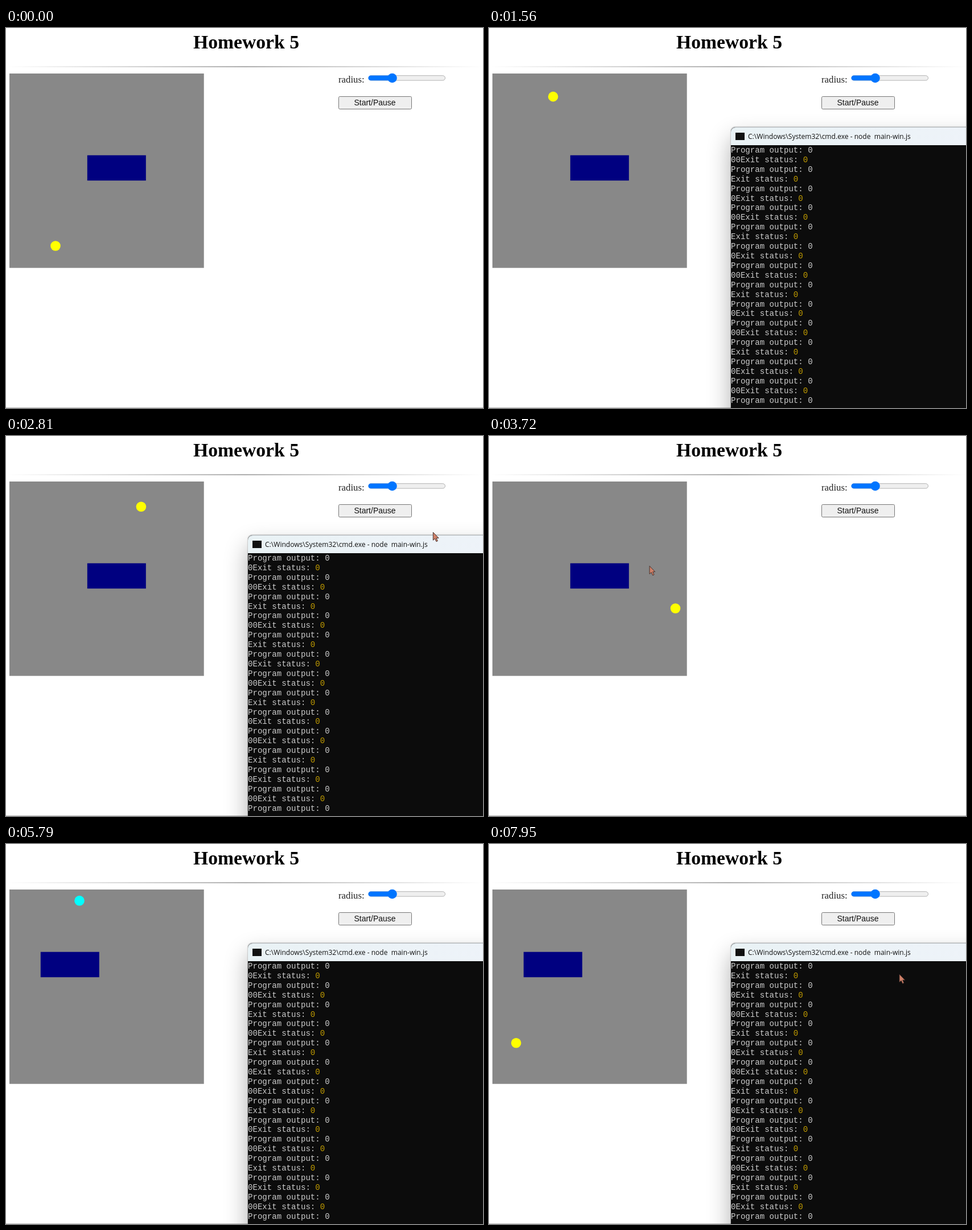
Write an HTML page that moves like this. It is 838 px wide and 668 px high and loops after 8000 ms.

```html
<!DOCTYPE html>
<html lang="en">
<head>
<meta charset="utf-8">
<title>Homework 5</title>
<style>
html, body { margin: 0; width: 100%; height: 100%; overflow: hidden; background: #fff; }
#stage { position: relative; width: 838px; height: 668px; max-height: 100%; overflow: hidden; }
svg { position: absolute; left: 0; top: 0; }
.serif { font-family: "Liberation Serif", serif; }
.sans { font-family: "Liberation Sans", sans-serif; }
#console {
  position: absolute; left: 425px; top: 174px; right: -40px; bottom: -40px;
  box-sizing: border-box; border-top: 1px solid #b4b9bd;
  border-radius: 8px 0 0 0; background: #0c0c0c; overflow: visible;
  box-shadow: 0 20px 42px rgba(0, 0, 0, .32), 0 0 2px rgba(0, 0, 0, .5);
}
#bar {
  height: 31px; border-radius: 8px 0 0 0;
  background: linear-gradient(90deg, #e9f2f5, #eef3f9);
  font: 12.05px/31px "Open Sans", sans-serif; color: #111; white-space: pre; text-indent: 30px;
}
#icon { position: absolute; left: 8px; top: 9px; width: 16px; height: 13px; background: #111; }
#log {
  height: 460px; margin: 0; padding-top: 1px; overflow: hidden; color: #ccc;
  font: 14.08px/16.9px "Liberation Mono", monospace;
}
#log b { font-weight: normal; color: #c19c00; }
</style>
</head>
<body>
<div id="stage">
  <svg width="838" height="668">
    <defs>
      <linearGradient id="rule">
        <stop offset="0" stop-color="#999" stop-opacity="0"/>
        <stop offset=".5" stop-color="#999"/>
        <stop offset="1" stop-color="#999" stop-opacity="0"/>
      </linearGradient>
    </defs>
    <text class="serif" x="422" y="36" font-size="33.65" font-weight="bold" text-anchor="middle">Homework 5</text>
    <rect x="2" y="67.3" width="836" height="1.6" fill="url(#rule)"/>
    <rect x="6" y="80" width="341.7" height="341.7" fill="#888"/>
    <rect id="block" width="103" height="44.5" fill="#000080"/>
    <circle id="ball" r="8.8"/>
    <text class="serif" x="584" y="96" font-size="16.8" fill="#222">radius:</text>
    <rect x="637" y="83.7" width="134.5" height="8.4" rx="4.2" fill="#efefef" stroke="#b2b2b2"/>
    <rect x="636.5" y="83.5" width="44" height="8.8" rx="4.4" fill="#0075ff"/>
    <circle cx="678.5" cy="88" r="8.3" fill="#0075ff"/>
    <rect x="584.5" y="120.5" width="128" height="22" rx="2" fill="#efefef" stroke="#767676"/>
    <text class="sans" x="648" y="135.5" font-size="14" text-anchor="middle" fill="#111">Start/Pause</text>
    <rect y="667" width="838" height="1" fill="#b8b8b8"/>
  </svg>
  <div id="console">
    <div id="bar">C:\Windows\System32\cmd.exe - node  main-win.js</div>
    <div id="icon"></div>
    <pre id="log"></pre>
  </div>
  <svg width="838" height="668">
    <path id="cursor" d="M0 0V14L3.2 11.2L5.6 16.4L8 15.3L5.7 10.2H9.8Z" fill="#cf8068" stroke="#3a2a26" stroke-width=".9"/>
  </svg>
</div>
<script>
const LOOP = 8000, FRAME = 69.44, LEAD = 44;
const $ = id => document.getElementById(id);
const [ball, block, consoleBox, log, cursor] = ['ball', 'block', 'console', 'log', 'cursor'].map($);

const ramp = (t, from, length) => Math.min(1, Math.max(0, (t - from) / length));

// Pointer moves: start, duration, and the place reached.
const home = { x: 801, y: 290 };
const moves = [
  { start: 2540, time: 270, x: 749, y: 166 },
  { start: 2810, time: 630, x: 733, y: 143 },
  { start: 3440, time: 320, x: 190, y: 246 },
  { start: 3800, time: 340, x: 108, y: 212 },
  { start: 4690, time: 150, x: 700, y: 390 },
  { start: 7740, time: 0, x: 796, y: 392 },
  { start: 7740, time: 200, x: 721, y: 229 }
];
const grab = moves[2], drop = moves[3];

function pointer(t) {
  let { x, y } = home;
  for (const m of moves) {
    if (t < m.start) break;
    const p = m.time ? ramp(t, m.start, m.time) : 1;
    x += (m.x - x) * p;
    y += (m.y - y) * p;
  }
  return { x, y, visible: t >= 2540 && t < 4840 || t >= 7740 };
}

function blockAt(t) {
  const p = ramp(t, drop.start, drop.time);
  return { x: 142.8 + (drop.x - grab.x) * p, y: 223.7 + (drop.y - grab.y) * p };
}

// The ball flies straight and bounces off the walls and the block, one step per ms.
function flight() {
  const path = [];
  let x = 87, y = 383, vx = -0.0998, vy = -0.198;
  for (let t = 0; t <= LOOP; t++) {
    path.push({ x, y });
    const b = blockAt(t);
    const overX = px => px > b.x + 3 && px < b.x + 100;
    const overY = py => py > b.y - 3.5 && py < b.y + 48;
    if (overX(x + vx) && overY(y + vy)) {
      if (overX(x)) vy = -vy; else vx = -vx;
    }
    if (x + vx < 22.3 || x + vx > 332.3) vx = -vx;
    if (y + vy < 98 || y + vy > 406) vy = -vy;
    x += vx;
    y += vy;
  }
  return path;
}
const path = flight();

// Every BEAT lines on average two echoes pile up, which leaves the next line bare.
const BEAT = 2.83, LINE_MS = 89, PAIRS = 13;
const beats = line => Math.ceil((line - 65) / BEAT);
const piled = line => beats(line) > beats(line - 1);

function exitLine(line) {
  const zeros = piled(line) ? '00' : piled(line - 1) ? '' : '0';
  return zeros + 'Exit status: <b>0</b>\n';
}

let lastLine = -1;
function drawLog(t) {
  const first = Math.floor(t / LINE_MS);
  if (first === lastLine) return;
  lastLine = first;
  const output = 'Program output: 0\n';
  let text = '';
  for (let i = 0; i < PAIRS; i++) text += output + exitLine(first + i);
  log.innerHTML = text + output;
}

const move = (node, { x, y }) => node.setAttribute('transform', `translate(${x} ${y})`);

function draw(t) {
  move(ball, path[Math.round(t)]);
  ball.setAttribute('fill', t >= 5350 && t < 7280 ? '#0ff' : '#ff0');
  move(block, blockAt(t));

  consoleBox.style.opacity = ramp(t, 350, 140) - ramp(t, 3440, 100) + ramp(t, 5380, 140);
  drawLog(t);

  const hand = pointer(t);
  cursor.style.display = hand.visible ? '' : 'none';
  move(cursor, hand);
}

// Each picture is held for one frame.
const hold = t => Math.max(0, Math.floor((t + LEAD) / FRAME) * FRAME - LEAD);

const start = performance.now();
function loop() {
  draw(hold((performance.now() - start) % LOOP));
  requestAnimationFrame(loop);
}
loop();
</script>
</body>
</html>
```
